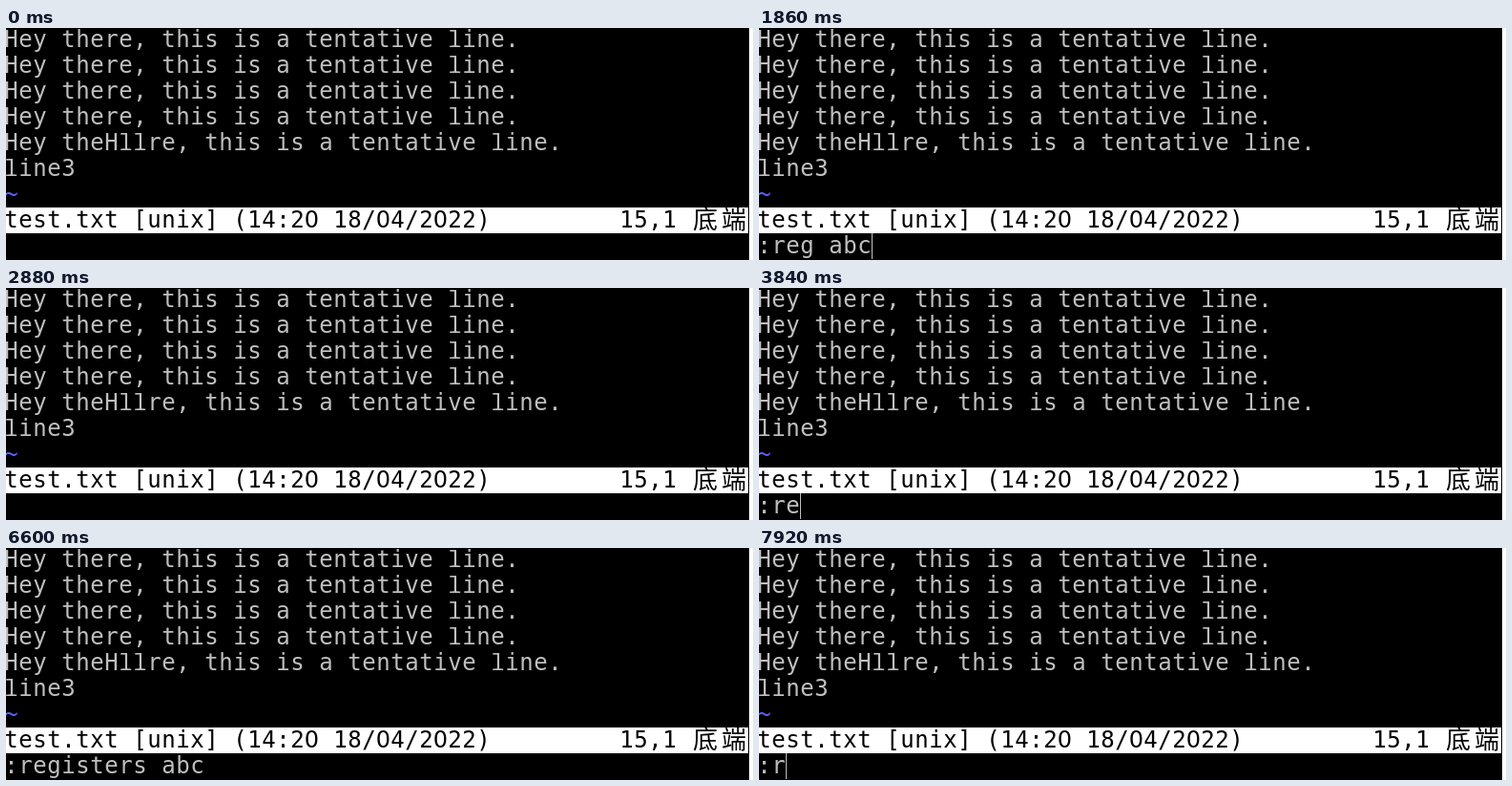
Animation, 783 px wide and 243 px high, one loop 8000 ms. Source, as an HTML page with a canvas:

```html
<!DOCTYPE html>
<html lang="en">
<head>
<meta charset="utf-8">
<title>Vim registers</title>
<style>
  html, body { margin: 0; width: 100%; height: 100%; overflow: hidden; background: #000; }
  canvas { display: block; width: 783px; height: 243px; }
</style>
</head>
<body>
<canvas id="term" width="783" height="243"></canvas>
<script>
const ctx = document.getElementById('term').getContext('2d');
const W = 783, H = 243, EDGE = 779, LOOP = 8000;
const CELL = 15, ROW = 27, LEFT = -2, TOP = -1, BASE = 21, LAST = 8;
const GREY = '#bfbfbf', BLUE = '#6060ff', PINK = '#ff40ff', GREEN = '#40ff40';
const LINE = 'Hey there, this is a tentative line.';

const MONO = '24px "DejaVu Sans Mono", monospace';
const HAN = '300 26px "Noto Sans CJK SC", "Noto Sans CJK", sans-serif';
// A plain zero and a slab-footed l
const SHAPES = {
  0: '24px "DejaVu Sans", sans-serif',
  l: '24px "Noto Sans Mono", monospace',
};

const colX = col => LEFT + col * CELL;
const rowY = row => TOP + row * ROW;
const isWide = ch => ch > '\u2e80';

function print(text, col, row, color = GREY) {
  ctx.fillStyle = color;
  ctx.textAlign = 'center';
  for (const ch of text) {
    const span = isWide(ch) ? 2 : 1;
    ctx.font = span === 2 ? HAN : SHAPES[ch] || MONO;
    ctx.fillText(ch, colX(col + span / 2), rowY(row) + BASE + span - 1);
    col += span;
  }
}

function cursor(col) {
  ctx.fillStyle = GREY;
  ctx.fillRect(colX(col), rowY(LAST), 1, ROW);
}

function statusBar(row) {
  ctx.fillStyle = '#fff';
  ctx.fillRect(0, rowY(row), 778, ROW);
  print('test.txt [unix] (14:20 18/04/2022)', 0, row, '#000');
  print('15,1 底端', 43, row, '#000');
}

function editor({ cmd = '', caret = cmd !== '', pending = '' }) {
  for (let row = 0; row < 4; row++) print(LINE, 0, row);
  print('Hey theHllre, this is a tentative line.', 0, 4);
  print('line3', 0, 5);
  print('~', 0, 6, BLUE);
  statusBar(7);
  print(cmd, 0, LAST);
  print(pending, 41, LAST);
  if (caret) cursor(cmd.length);
}

function registers({ cmd, caret }) {
  print('line3', 0, 0);
  print('~', 0, 1, BLUE);
  statusBar(2);
  print(cmd, 0, 3);
  print('Type Name Content', 0, 4, PINK);
  ['a', 'b', 'c'].forEach((name, i) => {
    const text = name === 'b' ? LINE + ' ' : LINE;
    print(`  l  "${name}   ${text}`, 0, 5 + i);
    print('^J', 10 + text.length, 5 + i, BLUE);
  });
  print('请按 ENTER 或其它命令继续', 0, LAST, GREEN);
  if (caret) cursor(25);
}

const events = [];
const at = (time, view, state = {}) => events.push({ time, view, state });
const type = (cmd, times) =>
  times.forEach((time, i) => at(time, editor, { cmd: cmd.slice(0, i + 1) }));

const SHORT = ':reg abc', LONG = ':registers abc';

at(0, editor);
at(780, editor, { pending: ':' });
type(SHORT, [840, 960, 1140, 1320, 1440, 1560, 1740, 1860]);
at(2040, registers, { cmd: SHORT, caret: true });
at(2520, registers, { cmd: SHORT, caret: false });
at(2820, registers, { cmd: SHORT, caret: true });
at(2880, editor);
type(LONG, [3240, 3720, 3840, 4260, 4440, 4560, 4740, 4920, 4980, 5160, 5460, 5700, 5940, 6240]);
at(6600, editor, { cmd: LONG, caret: false });
at(6660, registers, { cmd: LONG, caret: true });
at(7140, registers, { cmd: LONG, caret: false });
at(7440, editor);
type(':r', [7740, 7920]);

let shown = null;
const start = performance.now();

function tick() {
  const time = (performance.now() - start) % LOOP;
  const current = events.filter(e => e.time <= time).pop();
  if (current !== shown) {
    shown = current;
    ctx.fillStyle = '#000';
    ctx.fillRect(0, 0, W, H);
    ctx.fillStyle = '#fff';
    ctx.fillRect(EDGE, 0, W - EDGE, H);
    current.view(current.state);
  }
  requestAnimationFrame(tick);
}
tick();
</script>
</body>
</html>
```
